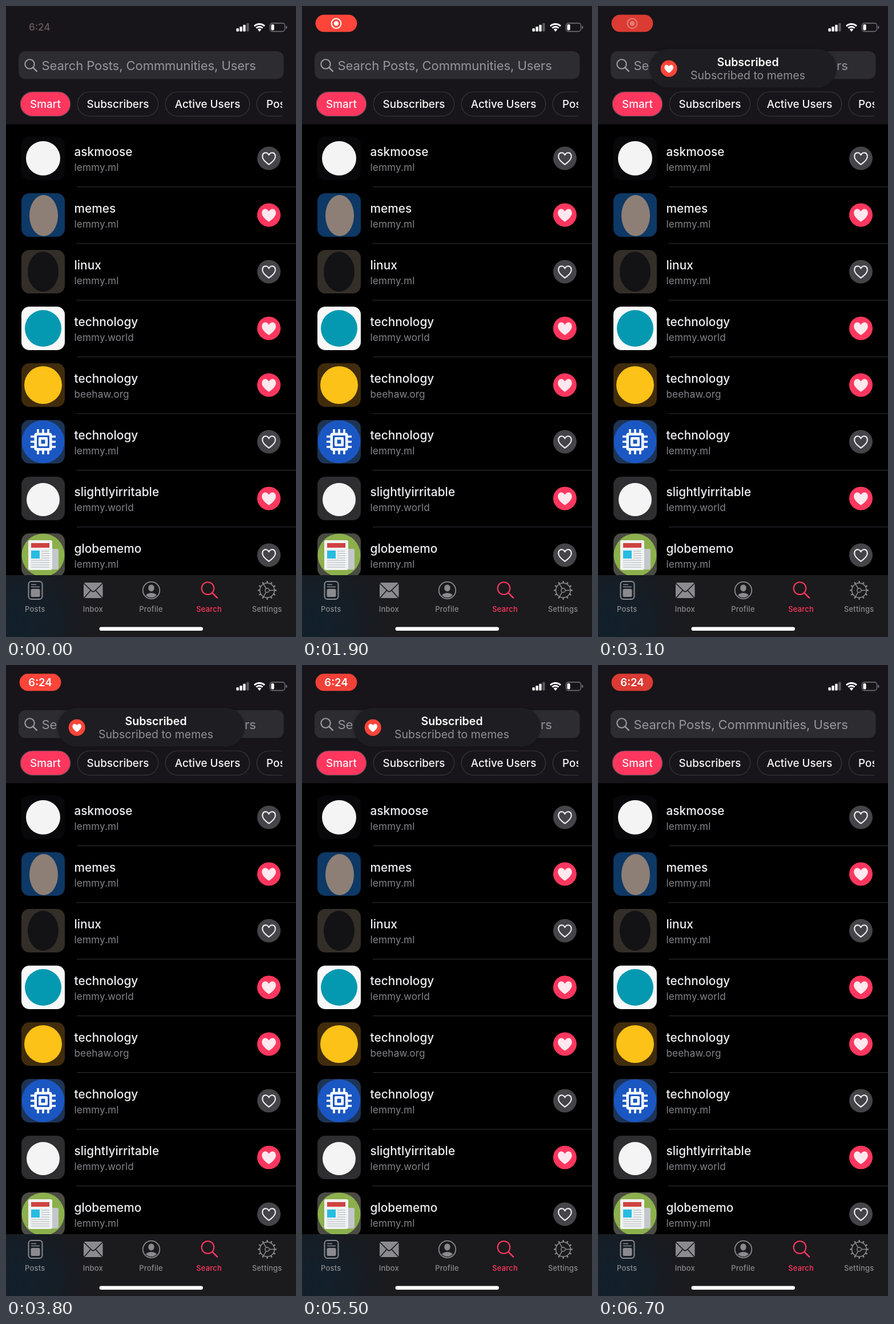
An HTML page with a canvas that plays this animation: 508x1102 px, repeating every 6800 ms.

```html
<!DOCTYPE html>
<html lang="en">
<head>
<meta charset="utf-8">
<title>Community search</title>
<style>
html, body { margin: 0; width: 100%; height: 100%; overflow: hidden; background: #000; }
canvas { display: block; width: 508px; height: 1102px; }
</style>
</head>
<body>
<canvas id="stage"></canvas>
<script>
const W = 508, H = 1102, LOOP = 6800, TAU = Math.PI * 2;
const PINK = '#ff375f', GRAY = '#8b8a8f', LABEL = '#f0eff2';
const canvas = document.getElementById('stage');
const ctx = canvas.getContext('2d');
const dpr = window.devicePixelRatio || 1;
canvas.width = W * dpr;
canvas.height = H * dpr;

const ROWS = [
  { name: 'askmoose', host: 'lemmy.ml', bg: '#08080a', art: () => disc(65, 38, 30, '#f4f4f4') },
  { name: 'memes', host: 'lemmy.ml', on: true, bg: '#0e3865', art: () => oval(66, 39, 25, 36, '#8d7f75') },
  { name: 'linux', host: 'lemmy.ml', bg: '#332e28', art: () => oval(65, 38, 27, 35, '#131316') },
  { name: 'technology', host: 'lemmy.world', on: true, bg: '#f8f8f9', art: () => disc(65, 38, 32, '#0499b0') },
  { name: 'technology', host: 'beehaw.org', on: true, bg: '#402c0c', art: () => disc(65, 38, 33, '#fcc218') },
  { name: 'technology', host: 'lemmy.ml', bg: '#1d3455', art: chip },
  { name: 'slightlyirritable', host: 'lemmy.world', on: true, bg: '#2e2e30', art: () => disc(65, 40, 29, '#f4f4f4') },
  { name: 'globememo', host: 'lemmy.ml', bg: '#4a4b42', art: newspaper }
];

const clamp = (v, a = 0, b = 1) => Math.min(b, Math.max(a, v));
const ramp = (t, start, len) => clamp((t - start) / len);

// Underdamped spring from 0 to 1, t in ms.
function spring(t, response = 0.55, damping = 0.825) {
  if (t <= 0) return 0;
  const s = t / 1000, w = TAU / response;
  const k = damping * w, wd = w * Math.sqrt(1 - damping * damping);
  return 1 - Math.exp(-k * s) * (Math.cos(wd * s) + k / wd * Math.sin(wd * s));
}

function box(x, y, w, h, r, fill, stroke, lw = 1) {
  ctx.beginPath();
  ctx.roundRect(x, y, w, h, r);
  paint(fill, stroke, lw);
}

function paint(fill, stroke, lw = 1) {
  if (fill) { ctx.fillStyle = fill; ctx.fill(); }
  if (stroke) { ctx.strokeStyle = stroke; ctx.lineWidth = lw; ctx.stroke(); }
}

function oval(x, y, rx, ry, fill, stroke, lw) {
  ctx.beginPath();
  ctx.ellipse(x, y, rx, ry, 0, 0, TAU);
  paint(fill, stroke, lw);
}

function disc(x, y, r, fill, stroke, lw) { oval(x, y, r, r, fill, stroke, lw); }

function lines(color, lw, ...paths) {
  ctx.beginPath();
  for (const [x, y, ...rest] of paths) {
    ctx.moveTo(x, y);
    for (let i = 0; i < rest.length; i += 2) ctx.lineTo(rest[i], rest[i + 1]);
  }
  paint(null, color, lw);
}

function text(str, x, y, size, color, { weight = 400, align = 'left', gap = 0 } = {}) {
  ctx.font = `${weight} ${size}px Inter, Roboto, sans-serif`;
  ctx.letterSpacing = gap + 'px';
  ctx.textAlign = align;
  ctx.textBaseline = 'alphabetic';
  ctx.fillStyle = color;
  ctx.fillText(str, x, y);
}

function heart(x, y, s, fill, stroke, lw) {
  const curve = (a, b, c, d, e, f) =>
    ctx.bezierCurveTo(x + a * s, y + b * s, x + c * s, y + d * s, x + e * s, y + f * s);
  ctx.beginPath();
  ctx.moveTo(x, y + s * 0.92);
  curve(-0.5, 0.58, -1, 0.15, -1, -0.3);
  curve(-1, -1.02, -0.27, -1.08, 0, -0.55);
  curve(0.27, -1.08, 1, -1.02, 1, -0.3);
  curve(1, 0.15, 0.5, 0.58, 0, 0.92);
  ctx.closePath();
  ctx.lineJoin = 'round';
  paint(fill, stroke, lw);
}

function lens(x, y, r, tip, color, lw) {
  disc(x, y, r, null, color, lw);
  ctx.lineCap = 'round';
  const d = r * Math.SQRT1_2;
  lines(color, lw + 0.4, [x + d, y + d, x + tip, y + tip]);
  ctx.lineCap = 'butt';
}

function chip() {
  disc(65, 38, 37.5, '#1b57c2');
  for (const d of [-9, 0, 9])
    lines('#fff', 3.6, [65 + d, 16, 65 + d, 60], [43, 38 + d, 87, 38 + d]);
  box(49.5, 22.5, 31, 31, 4, '#fff');
  box(54, 27, 22, 22, 1, '#1b57c2');
  box(57, 30, 16, 16, 2, '#fff');
  box(61.5, 34.5, 7, 7, 0, '#1b57c2');
}

function newspaper() {
  disc(65, 38, 37.5, '#8cb04c');
  box(77, 27, 15, 36, 3, '#c3c7cb');
  box(39, 12, 42, 52, 3, '#f0f2f3');
  box(44, 17, 32, 8, 0, '#cf4240');
  box(44, 30, 15, 14, 0, '#27bce0');
  for (let i = 0; i < 8; i++) {
    const y = 31 + i * 4;
    lines('#c5c9cc', 1.3, [i < 4 ? 62 : 44, y, 76, y]);
  }
}

function heartButton(x, y, on) {
  disc(x, y, 20.5, on ? PINK : '#454448');
  if (on) heart(x, y + 0.5, 12.3, '#ffe8ee');
  else heart(x, y + 0.5, 11.3, null, '#f0f0f2', 2.1);
}

function list() {
  ctx.fillStyle = '#000';
  ctx.fillRect(0, 206, W, 788);
  ROWS.forEach((row, i) => {
    ctx.save();
    ctx.translate(0, 228 + i * 99);
    ctx.save();
    box(27, 0, 76, 76, 14, row.bg);
    ctx.clip();
    row.art();
    ctx.restore();
    text(row.name, 119.5, 33.5, 20.8, LABEL, { weight: 500, gap: 0.05 });
    text(row.host, 119.5, 59.5, 17.2, '#848388', { gap: 0.1 });
    heartButton(460.5, 38, row.on);
    lines('#242326', 1.6, [124, 87.7, W, 87.7]);
    ctx.restore();
  });
}

function statusIcons() {
  for (let i = 0; i < 4; i++) {
    const h = 5.5 + i * 3.1;
    box(403.5 + i * 5.9, 44.5 - h, 4.4, h, 1.2, i < 3 ? '#fff' : '#59585c');
  }
  const a = Math.PI * 0.25;
  for (const r of [12.6, 7.8]) {
    ctx.beginPath();
    ctx.arc(444, 44, r, -Math.PI + a, -a);
    paint(null, '#fff', 3);
  }
  ctx.beginPath();
  ctx.moveTo(444, 45);
  ctx.arc(444, 44, 4.6, -Math.PI + a, -a);
  ctx.closePath();
  paint('#fff');
  box(462.5, 30, 26, 14.5, 4.2, null, '#79787d', 1.3);
  box(464.5, 32, 5.2, 10.5, 2, '#fff');
  box(490.3, 34.8, 2, 5, 1, '#79787d');
}

function header() {
  ctx.fillStyle = '#171519';
  ctx.fillRect(0, 0, W, 206.5);
  statusIcons();
  box(22, 79, 464.5, 48.5, 12, '#2d2c31');
  lens(41.5, 101.5, 8.2, 12.3, '#9d9ca1', 2.1);
  text('Search Posts, Commmunities, Users', 62.5, 111.5, 22.1, '#97969c', { gap: -0.12 });
  ctx.save();
  ctx.beginPath();
  ctx.rect(24, 145, 460, 52);
  ctx.clip();
  const chips = [['Smart', 25, 88], ['Subscribers', 125, 142], ['Active Users', 279, 148], ['Posts', 439, 84]];
  chips.forEach(([label, x, w], i) => {
    box(x + 0.3, 150, w - 0.6, 42.4, 21.2, i ? '#171519' : PINK, i ? '#37363a' : '#5b4a52', 1.2);
    text(label, i < 3 ? x + w / 2 : 456, 178, 18.9, '#f7f6f8', { weight: 500, align: i < 3 ? 'center' : 'left' });
  });
  ctx.restore();
}

function gear(x, y) {
  const spokes = (count, from, to, lw) => {
    for (let i = 0; i < count; i++) {
      const a = i * TAU / count, c = Math.cos(a), s = Math.sin(a);
      lines(GRAY, lw, [x + c * from, y + s * from, x + c * to, y + s * to]);
    }
  };
  disc(x, y, 12.8, null, GRAY, 1.6);
  disc(x, y, 3.6, null, GRAY, 1.5);
  spokes(12, 13, 16.4, 2.4);
  spokes(3, 4, 12.5, 1.5);
}

function tabBar() {
  const g = ctx.createRadialGradient(15, 1075, 0, 15, 1075, 135);
  g.addColorStop(0, '#11202b');
  g.addColorStop(0.45, '#151e27');
  g.addColorStop(1, '#1b1a1d');
  ctx.fillStyle = g;
  ctx.fillRect(0, 994, W, 108);

  box(39.5, 1005, 24, 31, 5, null, GRAY, 2);
  lines(GRAY, 1.6, [44, 1010.5, 53, 1010.5], [44, 1014.5, 59, 1014.5]);
  box(43.5, 1018, 16, 14, 2.5, GRAY);

  box(136, 1007, 33.5, 27, 3, GRAY);
  lines('#1b1a1d', 1.6, [136, 1008, 150, 1021.5, 152.7, 1023, 155.5, 1021.5, 169.5, 1008],
    [137, 1033.5, 148.5, 1020.5], [168.5, 1033.5, 157, 1020.5]);

  disc(254.5, 1020.5, 14.8, null, GRAY, 1.8);
  ctx.save();
  ctx.beginPath();
  ctx.arc(254.5, 1020.5, 12.6, 0, TAU);
  ctx.clip();
  oval(254.5, 1016.5, 5.2, 6, GRAY);
  oval(254.5, 1032, 10.5, 7, GRAY);
  ctx.restore();

  lens(353.5, 1017, 10.8, 16.5, PINK, 2.1);
  gear(457.5, 1020.5);
  ['Posts', 'Inbox', 'Profile', 'Search', 'Settings'].forEach((label, i) =>
    text(label, 50.8 + i * 101.6, 1057.5, 13, i === 3 ? PINK : GRAY, { weight: 500, align: 'center', gap: 0.2 }));
  box(163.5, 1084.5, 181.5, 6.5, 3.25, '#fff');
}

function recordPill(t) {
  const fadeOld = 1 - ramp(t, 50, 200);
  if (fadeOld > 0) {
    ctx.globalAlpha = fadeOld;
    text('6:24', 58.7, 43, 16.8, '#625457', { weight: 600, align: 'center' });
  }
  const show = ramp(t, 150, 300);
  if (show > 0) {
    const glow = 0.5 + 0.5 * Math.cos((t - 1900) / 2000 * TAU);
    const mix = (a, b) => Math.round(a + (b - a) * glow);
    const scale = 0.6 + 0.4 * spring(t - 150, 0.45, 0.7);
    ctx.save();
    ctx.translate(60, 30.3);
    ctx.scale(scale, scale);
    ctx.globalAlpha = show;
    box(-36.4, -15, 72.8, 30, 15, `rgb(${mix(215, 255)},${mix(58, 69)},${mix(50, 58)})`);
    ctx.globalAlpha = show * (1 - ramp(t, 3000, 150));
    disc(0, 0.2, 8.4, null, '#fff', 2);
    disc(0, 0.2, 4.2, '#fff');
    ctx.globalAlpha = ramp(t, 3100, 200);
    text('6:24', 0, 6.8, 18.5, '#fff', { weight: 600, align: 'center' });
    ctx.restore();
  }
  ctx.globalAlpha = 1;
}

function toast(t) {
  const p = spring(t - 1900) - spring(t - 5900);
  if (p < 0.005) return;
  ctx.save();
  ctx.globalAlpha = clamp(p);
  ctx.translate(0, (p - 1) * 67);
  ctx.shadowColor = 'rgba(0,0,0,0.2)';
  ctx.shadowBlur = 8 * dpr;
  box(90, 75, 328, 67.5, 33.75, '#1e1d21');
  ctx.shadowColor = 'transparent';
  disc(124.2, 109.3, 14.5, '#ff453a');
  heart(124.2, 109.8, 7.8, '#fff');
  text('Subscribed', 262.5, 104.8, 19.6, '#fff', { weight: 600, align: 'center' });
  text('Subscribed to memes', 262.5, 127.8, 19.5, '#929196', { align: 'center' });
  ctx.restore();
}

function draw(t) {
  ctx.setTransform(dpr, 0, 0, dpr, 0, 0);
  list();
  header();
  tabBar();
  recordPill(t);
  toast(t);
}

let start;
function tick(now) {
  start ??= now;
  draw((now - start) % LOOP);
  requestAnimationFrame(tick);
}
draw(0);
requestAnimationFrame(tick);
</script>
</body>
</html>
```
